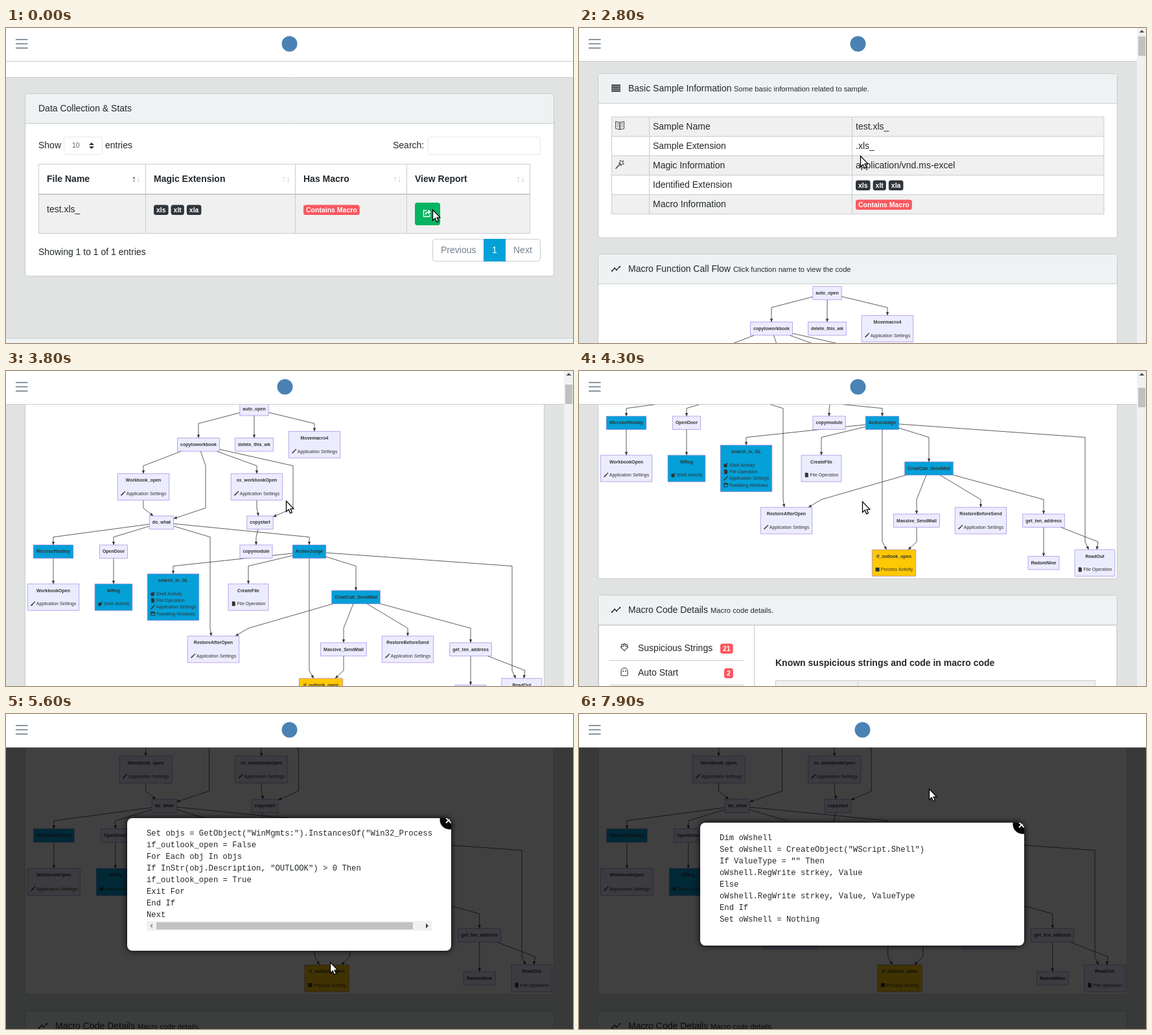
An HTML page with a canvas for the animation above (8 s loop, 875 px wide and 487 px high).

```html
<!DOCTYPE html>
<html lang="en">
<head>
<meta charset="utf-8">
<title>Macro report</title>
<style>
html, body { margin: 0; width: 100%; height: 100%; overflow: hidden; background: #e1e3e2; }
canvas { display: block; }
</style>
</head>
<body>
<canvas id="stage" width="875" height="487"></canvas>
<script>
const W = 875, H = 487, LOOP = 8000, STEP = 100;
const g = document.getElementById('stage').getContext('2d');
const SANS = '"Liberation Sans", Arial, sans-serif';
const MONO = '"Liberation Mono", "Courier New", monospace';
const C = {
  bg: '#e1e3e2', line: '#c8cccd', head: '#eef2f3', row: '#f0f0f0', ink: '#23282c', pale: '#c6c8ca',
  grey: '#73818f', dark: '#2f353a', red: '#f9575f', green: '#06b360', blue: '#04a0d8',
  amber: '#ffc805', node: '#ececff', nodeLine: '#9370db', edge: '#333'
};

// ---- drawing helpers ----
function text(s, x, yc, { size = 14, bold = false, color = C.ink, align = 'left', font = SANS } = {}) {
  const base = yc + size * 0.36;
  g.font = (bold ? 'bold ' : '') + size + 'px ' + font;
  g.fillStyle = color;
  g.textAlign = align;
  g.fillText(s, x, size < 8 ? base : Math.floor(base));
}
function paint(fill, stroke, width = 1) {
  if (fill) { g.fillStyle = fill; g.fill(); }
  if (stroke) { g.strokeStyle = stroke; g.lineWidth = width; g.stroke(); }
}
function box(x, y, w, h, fill, stroke, r = 0, width = 1) {
  g.beginPath();
  g.roundRect(x, y, w, h, r);
  paint(fill, stroke, width);
}
function disc(x, y, r, fill, stroke) {
  g.beginPath();
  g.arc(x, y, r, 0, Math.PI * 2);
  paint(fill, stroke);
}
function poly(pts, fill) {
  g.beginPath();
  pts.forEach(p => g.lineTo(...p));
  g.closePath();
  paint(fill);
}
function line(pts, color = C.line, width = 1) {
  g.beginPath();
  pts.forEach(p => g.lineTo(...p));
  paint(null, color, width);
}
const hline = (x1, x2, y, color, width) => line([[x1, y], [x2, y]], color, width);
const vline = (x, y1, y2) => line([[x, y1], [x, y2]]);
function at(x, y, draw, turn = 0) {
  g.save();
  g.translate(x, y);
  g.rotate(turn);
  draw();
  g.restore();
}
// small triangle, pointing up unless turned
const caret = (x, y, color, turn = 0, r = 4) =>
  at(x, y, () => poly([[-r, r / 2], [0, -r / 2], [r, r / 2]], color), turn * Math.PI / 2);

function badge(s, x, y, pad = 4) {
  g.font = 'bold 10.5px ' + SANS;
  const w = g.measureText(s).width + 2 * pad;
  box(x, y, w, 15.5, /^x/.test(s) ? C.dark : C.red, null, 3.5);
  text(s, x + pad, y + 7.8, { size: 10.5, bold: true, color: '#fff' });
  return x + w + 4;
}
const badges = (x, y) => ['xls', 'xlt', 'xla'].reduce((left, s) => badge(s, left, y), x);

// ---- icons ----
const icon = {
  wand() {
    line([[-3, 3], [1.6, -1.6]], C.edge, 1.6);
    disc(2.6, -2.6, 1, C.edge);
  },
  file() { box(-2.5, -3.5, 5, 7, C.edge, null, [0, 2, 0, 0]); },
  bomb() {
    disc(-0.5, 0.7, 2.8, C.edge);
    line([[1, -1], [3, -3]], C.edge, 1.2);
  },
  window() {
    box(-3, -2.6, 6, 5.4, null, C.edge, 0.5);
    hline(-3, 3, -1.6, C.edge, 2);
  },
  square() { box(-3, -3, 6, 6, C.edge); },
  bars() { for (let y = -5; y < 6; y += 3) box(-7, y - 0.5, 14, 2, C.ink); },
  trend() {
    const pts = [[-6, 3.5], [-2, -0.5], [1, 2], [6, -3]];
    line(pts, C.ink, 1.1);
    pts.forEach(p => disc(...p, 1.2, C.ink));
  },
  book() {
    for (const side of [-1, 1]) {
      line([[0, 6], [0, -5], [side * 6.5, -6.5], [side * 6.5, 4.5], [0, 6]], '#444');
      for (let y = -3; y < 4; y += 2.5) line([[side * 1.5, y], [side * 5, y - 0.8]], '#666', 0.8);
    }
  },
  bigWand() {
    line([[-6.5, 6.5], [1, -1]], '#444', 1.6);
    const star = Array.from({ length: 11 }, (_, i) => {
      const r = i % 2 ? 2 : 4.5, a = i * Math.PI / 5 - 0.8;
      return [2.5 + r * Math.cos(a), -2.5 + r * Math.sin(a)];
    });
    line(star, '#444');
  },
  puzzle() {
    at(0, 0, () => {
      box(-4, -4, 8, 8, null, C.ink);
      disc(4, 0, 1.8, '#fff', C.ink);
      disc(0, -4, 1.8, '#fff', C.ink);
    }, -Math.PI / 4);
  },
  ghost() {
    box(-5, -6, 10, 12, null, C.ink, [5, 5, 1, 1]);
    disc(-1.8, -1, 0.9, C.ink);
    disc(1.8, -1, 0.9, C.ink);
  },
  share() {
    line([[-1, -4.5], [-5.5, -4.5], [-5.5, 5], [4, 5], [4, 1.5]], '#fff', 1.3);
    line([[-2.5, 2], [-1.5, -1], [2, -2]], '#fff', 1.8);
    caret(3.5, -2, '#fff', 1);
  }
};

// ---- call graph ----
const ITEMS = {
  a: ['wand', 'Application Settings'], s: ['bomb', 'Shell Activity'], f: ['file', 'File Operation'],
  t: ['window', 'Tweaking Windows'], p: ['square', 'Process Activity']
};
// one layer per line, each node as label:centre:items
const LAYERS = `auto_open:383
copytoworkbook:297 delete_this_wk:383 Movemacro4:476:a
Workbook_open:212:a xx_workbookOpen:387:a
do_what:240 copystart:392
Microsofthobby:73 OpenDoor:166 copymodule:386 ActionJudge:468
WorkbookOpen:73:a WReg:166:s search_in_OL:258:sfat CreateFile:374:f CreatCab_SendMail:540
RestoreAfterOpen:320:a Massive_SendMail:521 RestoreBeforeSend:620:a get_ten_address:717
if_outlook_open:486:p RadomNine:717 ReadOut:796:f`;
// source>targets; @x is where a link runs down, @ alone keeps it below its source
const LINKS = `auto_open>copytoworkbook,delete_this_wk,Movemacro4
copytoworkbook>Workbook_open,do_what@308,xx_workbookOpen,copystart@443
Workbook_open>do_what@
xx_workbookOpen>copystart@
do_what>Microsofthobby,OpenDoor,RestoreAfterOpen@315,ActionJudge
copystart>copymodule
Microsofthobby>WorkbookOpen
OpenDoor>WReg
ActionJudge>search_in_OL,CreateFile,if_outlook_open@,CreatCab_SendMail,ReadOut@781
CreatCab_SendMail>RestoreAfterOpen@374,Massive_SendMail,RestoreBeforeSend,get_ten_address
Massive_SendMail>if_outlook_open@
get_ten_address>RadomNine,ReadOut@801`;
const FILLS = { Microsofthobby: C.blue, ActionJudge: C.blue, WReg: C.blue, search_in_OL: C.blue,
  CreatCab_SendMail: C.blue, if_outlook_open: C.amber };

function layout() {
  const nodes = {}, gap = 24.35;
  const width = (s, weight = '') => {
    g.font = weight + '7px ' + SANS;
    return g.measureText(s).width;
  };
  let top = 4;
  for (const layer of LAYERS.split('\n')) {
    const made = layer.split(' ').map(spec => {
      const [label, x, keys = ''] = spec.split(':');
      const items = [...keys].map(k => ITEMS[k]);
      const w = Math.max(width(label, 'bold ') + 9, ...items.map(([, s]) => width(s) + 18));
      const h = items.length ? 30.75 + 10.25 * items.length : 20.5;
      return nodes[label] = { label, x: +x, w, h, items, fill: FILLS[label] || C.node };
    });
    const tall = Math.max(...made.map(n => n.h));
    made.forEach(n => {
      n.y = top + tall / 2;
      n.above = top - gap / 2;
      n.below = top + tall + gap / 2;
    });
    top += tall + gap;
  }
  const edges = LINKS.split('\n').flatMap(row => {
    const [from, targets] = row.split('>');
    return targets.split(',').map(s => {
      const [to, bend] = s.split('@');
      const a = nodes[from], b = nodes[to];
      return { a, b, x: bend === undefined ? b.x : +bend || a.x };
    });
  });
  return { nodes: Object.values(nodes), edges };
}
const graph = layout();

// where the line from a node's centre to (x, y) leaves its frame
function rim(n, x, y) {
  const dx = x - n.x, dy = y - n.y;
  const k = Math.min(n.w / 2 / (Math.abs(dx) || 1e-6), n.h / 2 / (Math.abs(dy) || 1e-6));
  return [n.x + dx * k, n.y + dy * k];
}
function drawEdge({ a, b, x }) {
  const end = rim(b, x, b.above);
  line([rim(a, x, a.below), [x, a.below], [x, b.above], end], C.edge, 0.8);
  at(...end, () => poly([[0, 0], [-5, -2.2], [-5, 2.2]], C.edge), Math.atan2(end[1] - b.above, end[0] - x));
}
function drawNode(n) {
  const left = n.x - n.w / 2, top = n.y - n.h / 2;
  box(left, top, n.w, n.h, n.fill, C.nodeLine, 0, 0.6);
  text(n.label, n.x, top + 9.9, { size: 7, bold: true, align: 'center', color: C.edge });
  n.items.forEach(([glyph, s], i) => {
    const y = top + 30.7 + i * 10.25;
    at(left + 8.3, y, icon[glyph]);
    text(s, left + 13.5, y, { size: 7, color: C.edge });
  });
}
function drawGraph(top, scale) {
  g.save();
  g.translate(30 - 30 * scale, top);
  g.scale(scale, scale);
  graph.edges.forEach(drawEdge);
  graph.nodes.forEach(drawNode);
  g.restore();
}

// ---- page parts ----
function card(y, h, right, title, small, smallX, glyph) {
  box(29.5, y, right - 29.5, h, '#fff', C.line, 4);
  box(30, y + 0.5, right - 30.5, 45.5, C.head, null, [3, 3, 0, 0]);
  hline(30, right, y + 46);
  if (glyph) at(57, y + 22.5, icon[glyph]);
  text(title, glyph ? 76 : 50, y + 23);
  if (small) text(small, smallX, y + 24, { size: 11.2 });
}
function breadcrumb(w, y) {
  box(0, y, w, 24, '#fff');
  hline(0, w, y + 24.5);
}
function topBar(w) {
  box(0, 0, w, 51, '#fff');
  hline(0, w, 51.5);
  for (const dy of [-6.6, 0, 6.6]) hline(15, 33.5, 24.4 + dy, C.grey, 1.7);
  disc(w / 2, 24.5, 12, '#4a82b4');
}
function scrollbar(y) {
  box(861, 0, 14, H, '#f1f1f1');
  caret(868.5, 5, y > 0 ? '#505050' : '#a3a3a3');
  box(863, 12 + Math.round(y * 0.0241), 11, 30, '#c1c1c1');
}

function listPage(t) {
  card(101.5, 282, 845.5, 'Data Collection & Stats');
  text('Show', 50, 181);
  box(89.5, 168.5, 59, 27, '#fff', '#e4e7ea', 3);
  text('10', 102, 182, { size: 10.5, color: '#5c6873' });
  caret(132, 179, C.dark);
  caret(132, 185, C.dark, 2);
  text('entries', 153, 181);
  text('Search:', 597, 181);
  box(651.5, 168.5, 173, 27, '#fff', '#e4e7ea', 3);

  box(50.5, 210.5, 758, 107, '#fff', C.line);
  box(51, 257, 757, 60, C.row);
  const cols = [50.5, 215.5, 446.5, 618.5, 808.5];
  ['File Name', 'Magic Extension', 'Has Macro', 'View Report'].forEach((s, i) => {
    vline(cols[i], 210, 318);
    text(s, cols[i] + 12.5, 233, { bold: true });
    text('↑', cols[i + 1] - 21.5, 233, { color: i ? C.pale : C.ink });
    text('↓', cols[i + 1] - 14.5, 233, { color: C.pale });
  });
  hline(50, 809, 257, C.line, 2);
  text('test.xls_', 63, 280);
  badges(228, 273.5);
  badge('Contains Macro', 459, 273.5);

  const focus = Math.min(1, Math.max(0, (t - 500) / 300));
  if (focus) {
    g.globalAlpha = focus * 0.5;
    box(627.5, 266.5, 46.5, 42.5, '#4dbd74', null, 7);
    g.globalAlpha = 1;
  }
  box(631, 270, 39, 35, focus ? '#069a52' : C.green, null, 4);
  at(650, 286.5, icon.share);

  text('Showing 1 to 1 of 1 entries', 50, 346);
  box(658.5, 326.5, 166, 34, '#fff', C.line, 4);
  box(737, 326, 34, 35, C.blue);
  text('Previous', 671, 343, { color: C.grey });
  text('1', 754, 343, { color: '#fff', align: 'center' });
  text('Next', 783, 343, { color: C.grey });

  box(0, 480, W, 7, '#f0f3f4');
  hline(0, W, 479.5);
  breadcrumb(W, 52);
}

const RAW = [
  'graph TB Workbook_open[<b><center>Workbook_open</center> </b>] --> do_what[<b><center>do_what</center> </b>',
  '<br>fa:fa-magic Application Settings] xx_workbookOpen[<b><center>xx_workbookOpen</center> </b>] --> copystart[<b>',
  '<center>copystart</center> </b>] auto_open[<b><center>auto_open</center> </b>] --> copytoworkbook[<b>'
];

function reportPage(t, w, scroll) {
  const right = w - 30 + (w === W ? 0.5 : -0.5);
  const scale = w === W ? 1.02 : 1;
  g.save();
  g.translate(0, -scroll);

  card(101.5, 254, right, 'Basic Sample Information', 'Some basic information related to sample.', 239, 'bars');
  ['Sample Name', 'Sample Extension', 'Magic Information', 'Identified Extension', 'Macro Information'].forEach((s, i) => {
    box(50.5, 168.5 + i * 30, right - 71, 30, i % 2 ? '#fff' : C.row, C.line);
    text(s, 114, 183 + i * 30);
  });
  vline(108.5, 168, 319);
  vline(421.5, 168, 319);
  at(63, 182, icon.book);
  at(63, 242, icon.bigWand);
  ['test.xls_', '.xls_', 'application/vnd.ms-excel'].forEach((s, i) => text(s, 427, 183 + i * 30));
  badges(427, 266.5);
  badge('Contains Macro', 427, 296.5);

  const bodyH = Math.floor(475.5 * scale) + 0.5 * (scale === 1);
  card(380.5, 46 + bodyH, right, 'Macro Function Call Flow', 'Click function name to view the code', 238, 'trend');
  if (t < 1700) RAW.forEach((s, i) => text(s, 30, 437 + i * 21));
  else drawGraph(426.5, scale);

  const y = Math.floor(452 + bodyH) + 0.5;
  card(y, 900, right, 'Macro Code Details', 'Macro code details.', 203, 'trend');
  box(30.5, y + 46.5, right - 31, 853, null, C.line);
  vline(270.5, y + 46, y + 900);
  [['puzzle', 'Suspicious Strings', '21', 218], ['ghost', 'Auto Start', '2', 224]].forEach(([glyph, s, count, x], i) => {
    const mid = y + 81.5 + i * 38;
    at(70, mid - 1, icon[glyph]);
    text(s, 91, mid);
    badge(count, x, mid - 6.5);
    hline(47, 254, mid + 19.5);
  });
  text('Known suspicious strings and code in macro code', 303, y + 104.5, { bold: true });
  box(303.5, y + 132, 493, 60, C.row, C.line);
  vline(430.5, y + 132, y + 192);
  g.restore();

  const p = Math.min(1, Math.max(0, (t - 1165) / 1000));
  if (p < 1) {
    g.globalAlpha = (1 - p) ** 2;
    box(0, 52, w, H, C.bg);
    g.globalAlpha = 1;
  }
  breadcrumb(w, 52 - scroll);
}

// ---- popup ----
const CODE = [`Set objs = GetObject("WinMgmts:").InstancesOf("Win32_Process")
if_outlook_open = False
For Each obj In objs
If InStr(obj.Description, "OUTLOOK") > 0 Then
if_outlook_open = True
Exit For
End If
Next`, `Dim oWshell
Set oWshell = CreateObject("WScript.Shell")
If ValueType = "" Then
oWshell.RegWrite strkey, Value
Else
oWshell.RegWrite strkey, Value, ValueType
End If
Set oWshell = Nothing`].map(s => s.split('\n'));

function popup(lines, wide) {
  const h = 46 + lines.length * 18 + (wide ? 15 : 0);
  const top = Math.floor(263.5 - h / 2);
  g.save();
  g.shadowColor = '#000';
  g.shadowBlur = 10;
  box(187, top, 500, h, '#fff', null, 8);
  g.restore();

  g.save();
  box(187, top, 500, h, null, null, 8);
  g.clip();
  disc(684.5, top + 2.5, 15, '#050505');
  for (const k of [-1, 1]) line([[679, top + 3.5 - 4 * k], [687, top + 3.5 + 4 * k]], '#fff', 1.8);
  g.beginPath();
  g.rect(217, top, 440, h);
  g.clip();
  lines.forEach((s, i) => text(s, 217, top + 23 + i * 18, { size: 12.25, font: MONO }));
  if (wide) {
    const y = top + 159;
    box(217, y, 440, 15, '#f1f1f1');
    box(232, y + 2, 396, 11, '#c1c1c1');
    caret(224, y + 7.5, '#a3a3a3', -1);
    caret(650, y + 7.5, '#404040', 1);
  }
  g.restore();
}

// ---- pointer ----
function arrow() {
  g.beginPath();
  [[0.5, 0], [0.5, 16.5], [4.2, 13], [6.6, 18.8], [9.4, 17.6], [7, 12], [11.8, 11.8]].forEach(p => g.lineTo(...p));
  g.closePath();
  paint('#fff', '#000', 1.3);
}
function hand() {
  const parts = () => {
    g.beginPath();
    g.roundRect(-4, -1, 4, 16, 2);
    g.roundRect(-5, 8, 15, 15, 4);
    g.roundRect(-9, 11, 7, 6, 3);
  };
  parts();
  paint(null, '#000', 2);
  parts();
  paint('#fff');
}

// ---- timeline ----
function ease(t, from, to) {
  const p = Math.min(1, Math.max(0, (t - from) / (to - from)));
  return p * p * (3 - 2 * p);
}
const within = (t, a, b) => t >= a && t < b;
const scrollAt = t => 333 * ease(t, 2650, 3450) + 248 * ease(t, 3600, 4300) - (t >= 4400 ? 103 : 0);

// each leg: start, end, and the place it leads to
const legs = [
  [1550, 2300, 434, 228], [2400, 2500, 434, 198], [2800, 3300, 429, 200], [3400, 4300, 437, 202],
  [4500, 5200, 497, 387], [5500, 5600, 500, 384], [5600, 6400, 600, 120], [6500, 6800, 325, 247],
  [6800, 7100, 120, 243], [7200, 7400, 176, 243], [7500, 7700, 291, 214], [7800, 7900, 540, 116]
];
const pointerAt = t => legs.reduce(([x, y], [from, to, nx, ny]) => {
  const p = ease(t, from, to);
  return [x + (nx - x) * p, y + (ny - y) * p];
}, [658, 281]);

function draw(t) {
  const first = within(t, 5600, 6600), second = t >= 7600;
  const report = t >= 1100, open = first || second;
  const w = report && !open ? 861 : W;
  const scroll = Math.round(scrollAt(t));

  box(0, 0, W, H, C.bg);
  if (report) reportPage(t, w, scroll);
  else listPage(t);
  if (open) box(0, 0, W, H, 'rgba(0,0,0,.75)');
  topBar(w);
  if (w < W) scrollbar(scroll);
  if (open) popup(CODE[first ? 0 : 1], first);

  const pointing = within(t, 100, 1100) || within(t, 5400, 5600) || within(t, 7300, 7600);
  at(...pointerAt(t).map(Math.round), pointing ? hand : arrow);
}

const start = performance.now();
function tick(now) {
  const t = Math.max(0, now - start) % LOOP;
  draw(Math.floor(t / STEP) * STEP);
  requestAnimationFrame(tick);
}
draw(0);
requestAnimationFrame(tick);
</script>
</body>
</html>
```
